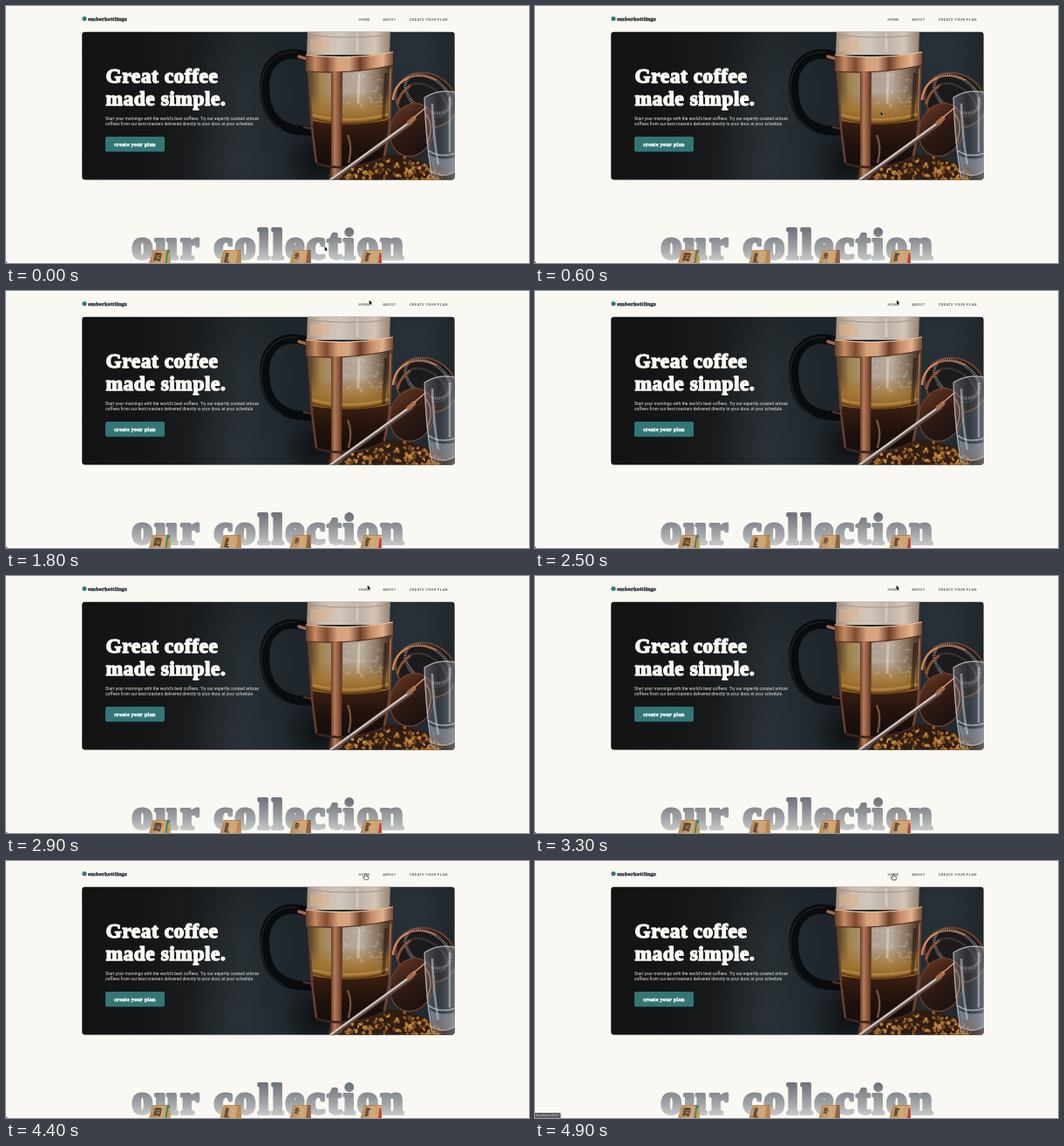
These frames come from a looping animation (600x295 px, 5 s). An HTML page with a canvas:

```html
<!DOCTYPE html>
<html lang="en">
<head>
<meta charset="utf-8">
<title>Coffee shop landing page</title>
<style>
  html, body { margin: 0; width: 100%; height: 100%; overflow: hidden; background: #faf8f2; }
  canvas { display: block; width: 600px; height: 295px; }
</style>
</head>
<body>
<canvas id="stage"></canvas>
<script>
const W = 600, H = 295, LOOP = 5000, STEP = 100;
const SERIF = '"Liberation Serif", "Times New Roman", serif';
const SANS = 'Roboto, "Liberation Sans", sans-serif';
const CREAM = '#fdfbf5';
const dpr = window.devicePixelRatio || 1;

function prepare(canvas) {
  canvas.width = W * dpr;
  canvas.height = H * dpr;
  const c = canvas.getContext('2d');
  c.scale(dpr, dpr);
  c.lineJoin = 'round';
  return c;
}

const view = prepare(document.getElementById('stage'));
const page = document.createElement('canvas');
const g = prepare(page);

let seed = 7;
function rnd(a, b) {
  seed = (seed * 16807) % 2147483647;
  return a + (b - a) * seed / 2147483647;
}

function grad(x0, y0, x1, y1, ...colors) {
  const f = g.createLinearGradient(x0, y0, x1, y1);
  colors.forEach((c, i) => f.addColorStop(i / (colors.length - 1), c));
  return f;
}

function glow(x, y, r, rgb, alpha) {
  const f = g.createRadialGradient(x, y, 0, x, y, r);
  f.addColorStop(0, `rgba(${rgb},${alpha})`);
  f.addColorStop(1, `rgba(${rgb},0)`);
  g.fillStyle = f;
  g.fillRect(x - r, y - r, 2 * r, 2 * r);
}

function rect(fill, x, y, w, h, r = 0) {
  g.fillStyle = fill;
  g.beginPath();
  g.roundRect(x, y, w, h, r);
  g.fill();
}

function shape(fill, d) {
  g.fillStyle = fill;
  g.fill(new Path2D(d));
}

function line(color, width, d) {
  g.strokeStyle = color;
  g.lineWidth = width;
  g.stroke(new Path2D(d));
}

function oval(x, y, rx, ry, turn, fill, stroke, width) {
  g.beginPath();
  g.ellipse(x, y, rx, ry, turn, 0, Math.PI * 2);
  if (fill) { g.fillStyle = fill; g.fill(); }
  if (stroke) { g.strokeStyle = stroke; g.lineWidth = width; g.stroke(); }
}

// weight thickens the glyphs with an outline
function text(str, x, y, font, fill, weight = 0, spacing = 0) {
  g.font = font;
  g.letterSpacing = spacing + 'px';
  g.fillStyle = fill;
  g.fillText(str, x, y);
  if (weight) {
    g.strokeStyle = fill;
    g.lineWidth = weight;
    g.strokeText(str, x, y);
  }
  g.letterSpacing = '0px';
}

function backdrop() {
  rect(grad(87, 0, 515, 0, '#131314', '#141516', '#181a1c', '#21272b', '#1f262b', '#20272c', '#242c32', '#20272c'),
    87, 29, 428, 172);
  glow(270, 100, 70, '62,74,82', 0.22);
  glow(265, 180, 70, '66,76,84', 0.3);
  glow(470, 55, 50, '60,74,84', 0.25);
  glow(360, 178, 42, '6,7,9', 0.7);
}

function strainer() {
  oval(482, 108, 36, 30, 0.5, '#1c1a1b', '#6b412f', 2);
  g.setLineDash([1.1, 1.3]);
  oval(484, 101, 29, 18, 0.6, null, '#8d8886', 3.6);
  oval(483, 108, 26, 15, 0.6, null, '#55504f', 2.4);
  g.setLineDash([]);
  oval(466, 142, 25, 31, 0.35, grad(445, 112, 488, 170, '#6d3b25', '#2e1913', '#151011'), '#6e432f', 1.2);
  line('#d28b5e', 2.4, 'M444 108 Q445 90 462 82');
  line('#8d5134', 3, 'M449 113 Q451 100 464 91');
  line('#b8714a', 1.6, 'M461 82 Q478 77 494 85');
  line('#a5633f', 1.8, 'M482 124 Q492 138 483 158');
}

function beans() {
  shape('#2f1c11', 'M382 200 Q394 180 416 172 Q446 165 486 182 L515 190 V200 Z');
  const tones = ['#a8702f', '#c08743', '#6d421f', '#3a2213', '#93602b'];
  for (let i = 0; i < 170; i++) {
    const x = rnd(390, 500);
    const top = 172 + Math.abs(x - 440) ** 2 / 170;
    oval(x, rnd(Math.min(top, 198), 201), rnd(1.5, 3), rnd(1.1, 2.1), rnd(0, 3), tones[i % 5]);
  }
}

function handle() {
  const arc = 'M346 58 C312 47 294 69 297 99 C299 130 318 146 354 143';
  g.lineCap = 'round';
  line('#0a0b0d', 11, arc);
  line('rgba(92,105,114,.45)', 0.8, 'M333 53 C306 51 291 73 293 100 C295 121 304 135 318 142');
  line('#a56c4c', 3.4, 'M336 58 L346 61');
  line('#4d3126', 2.4, 'M342 139 L352 141');
  g.lineCap = 'butt';
}

function press() {
  // glass and its contents
  shape(grad(344, 0, 443, 0, '#a08d7c', '#cdbfb0', '#cfc6bd', '#bdb1a5', '#d3c6b8', '#8e7a69'),
    'M346 29 H441 L440 56 H345 Z');
  shape(grad(345, 0, 441, 0, '#45331f', '#a5844d', '#a8967f', '#b0a396', '#b9aa99', '#8d7863', '#3f2c20'),
    'M346 70 H441 L437 134 H352 Z');
  shape(grad(0, 98, 0, 136, 'rgba(150,108,50,0)', 'rgba(164,116,45,.75)', '#8a5a1d'),
    'M349 98 H440 L437 136 H352 Z');
  shape(grad(0, 132, 0, 190, '#3a1e10', '#1f110d', '#120d0d'),
    'M352 132 Q394 140 438 131 L435 172 Q395 192 357 182 Z');
  g.setLineDash([1.3, 0.8]);
  line('#c39a4b', 2.4, 'M352 125 Q394 136 439 124');
  g.setLineDash([]);
  line('#5f3c17', 1.4, 'M352 129 Q394 141 438 128');
  for (let i = 0; i < 70; i++)
    oval(rnd(388, 434), rnd(79, 116), rnd(0.5, 2.2), rnd(0.5, 1.8), 0, 'rgba(218,208,194,.22)');
  line('rgba(240,234,225,.4)', 3, 'M403 31 V53 M405 77 L404 112');
  line('rgba(30,18,12,.5)', 4, 'M436 77 L433 130');
  line('#7a5038', 2.4, 'M392 148 Q398 162 393 180');
  line('#a89280', 1.2, 'M346 33 Q394 39 441 33');
  shape('rgba(222,178,138,.55)', 'M349 38 H371 V52 H349 Z');

  // copper frame
  shape(grad(342, 0, 445, 0, '#54301f', '#c68b62', '#7d4b33', '#d9a27a', '#d5a582', '#6d3e29', '#c88d66', '#e0b38f', '#6d3f2b'),
    'M344 55 Q394 62 444 52 V68 Q394 79 344 75 Z');
  line('#e8c3a2', 1, 'M344 56 Q394 63 444 53');
  line('#4a291c', 1.2, 'M344 75 Q394 79 444 68');
  shape(grad(372, 0, 387, 0, '#4f2b1d', '#b67c58', '#8a543a', '#3c2219'),
    'M373 75 H386 L385 184 L387 196 Q378 201 370 198 L373 184 Z');
  line('#6a402c', 2.4, 'M347 75 L351 140 L356 180');
  line('#6f432f', 3, 'M442 69 L440 142 L434 172');
  line('#bd8560', 1, 'M441 72 L439 130');
  line('#3d241b', 2.6, 'M356 181 Q394 192 434 174');
}

function plunger() {
  g.lineCap = 'round';
  line('#5d4c46', 4.2, 'M371 202 L465 134');
  line('#cfc3bd', 2.4, 'M370 201 L465 132');
  line('#a86c4a', 5, 'M462 134 L468 129');
  line('#d29a75', 1.6, 'M468 128 L481 117');
  g.lineCap = 'butt';
}

function tumbler() {
  shape(grad(478, 0, 515, 0, 'rgba(178,184,194,.42)', 'rgba(100,108,118,.25)', 'rgba(170,176,188,.5)'),
    'M480 105 Q497 94 515 99 V200 H489 Q481 160 480 105 Z');
  line('rgba(214,217,224,.75)', 1.2, 'M480 105 Q482 160 489 197 M480 105 Q496 95 515 99');
  line('rgba(214,217,226,.5)', 2.6, 'M489 112 Q490 150 496 182 M509 105 V168');
  line('rgba(212,215,222,.6)', 1.8, 'M485 166 Q498 175 515 169 M487 190 Q501 198 515 190');
  shape('rgba(200,202,212,.4)', 'M486 171 Q499 178 515 174 V190 Q502 196 489 190 Z');
}

function hero() {
  g.save();
  g.beginPath();
  g.roundRect(87.2, 29.7, 427.5, 169.7, 3.4);
  g.clip();
  [backdrop, strainer, beans, handle, press, plunger, tumbler].forEach(draw => draw());
  g.restore();

  const title = `bold 23.4px ${SERIF}`, body = `4.9px ${SANS}`;
  text('Great coffee', 114.5, 88.2, title, CREAM, 1.5, 0.55);
  text('made simple.', 114.5, 113.6, title, CREAM, 1.5, 0.55);
  text("Start your mornings with the world's best coffees. Try our expertly curated artisan",
    114, 130.9, body, '#e9e7e3');
  text('coffees from our best roasters delivered directly to your door, at your schedule.',
    114, 137, body, '#e9e7e3');
  rect('#327676', 114, 150, 68, 17.3, 2);
  text('create your plan', 124, 160.8, `bold 6.6px ${SERIF}`, CREAM, 0.4, 0.1);
}

function header() {
  oval(90, 14.6, 2.6, 2.6, 0, '#2b7d7a');
  text('emberkettlings', 94, 16.8, `bold 6.8px ${SERIF}`, '#2c3038', 0.35, 0.1);
  const nav = `bold 4.3px ${SANS}`;
  [['HOME', 404.5], ['ABOUT', 432.2], ['CREATE YOUR PLAN', 462.7]]
    .forEach(([label, x]) => text(label, x, 16.7, nav, '#6c7178', 0, 0.26));
}

function bag(x, words, edge, trim) {
  shape(grad(x, 0, x + 23, 0, '#b98c5c', '#d2a977', '#c79b69'),
    `M${x + 2} 280.5 L${x + 22} 280 L${x + 20} 295 H${x - 2} Z`);
  shape(edge, `M${x + 18.5} 280 H${x + 22} L${x + 22.5} 295 H${x + 16.5} Z`);
  if (trim) shape(trim, `M${x + 20} 284 L${x + 22} 283 L${x + 22.5} 295 H${x + 18.5} Z`);
  line('#9a7148', 0.6, `M${x + 2} 280.8 L${x + 22} 280.3`);
  words.forEach((word, i) => {
    g.save();
    g.translate(x + 5 + i * 4.5, 283);
    g.rotate(1.75);
    text(word, 0, 0, `bold 7px ${SERIF}`, '#332a23', 0.2);
    g.restore();
  });
}

function collection() {
  const ink = grad(0, 257, 0, 302, '#71767d', '#a4a7aa', '#e6e5e1');
  text('our collection', 144.5, 290.2, `bold 47.5px ${SERIF}`, ink, 3.8, 2.75);
  bag(166, ['esk', 'gro'], '#3d8581', '#c99c43');
  bag(247.5, ['mal'], '#b98751');
  bag(327.5, ['tic'], '#8f6047');
  bag(408.5, ['lun'], '#d0a572', '#b8433f');
}

function buildPage() {
  rect('#faf8f2', 0, 0, W, H);
  header();
  hero();
  collection();
  shape('#222', 'M0 293 Q.4 294.6 2 295 H0 Z');
}

// time, x, y of the pointer tip
const path = [
  [0, 365.6, 276], [300, 379, 207], [600, 396.4, 121], [900, 410, 50], [1200, 416, 14],
  [1400, 416.7, 10.6], [1800, 416.7, 10.6], [2500, 415, 10.6], [3300, 414.6, 10.8],
  [4000, 414, 11.6], [4200, 413, 15], [4800, 411.2, 15.6], [LOOP, 411.2, 15.6]
];

function tipAt(t) {
  const i = path.findIndex(p => p[0] > t);
  const [t0, x0, y0] = path[i - 1], [t1, x1, y1] = path[i];
  const k = (t - t0) / (t1 - t0);
  return [x0 + (x1 - x0) * k, y0 + (y1 - y0) * k];
}

const arrow = new Path2D('M0 0 V4.9 L1.1 3.9 L1.9 5.6 L2.7 5.2 L2 3.6 L3.5 3.5 Z');
const hand = new Path2D('M-.7 .5 Q0 -.4 .6 .5 V2.3 L2.5 2.7 Q3.1 2.9 3 3.6 L2.5 6 H-.8 ' +
  'L-2.5 3.8 Q-2.5 3 -1.7 3.3 L-.7 4 Z');

function pointer(t) {
  view.save();
  view.translate(...tipAt(t));
  const onLink = t >= 4200;
  const icon = onLink ? hand : arrow;
  view.lineWidth = onLink ? 1.2 : 0.7;
  view.strokeStyle = onLink ? '#222' : '#f4f4f4';
  view.fillStyle = onLink ? '#fff' : '#111';
  view.stroke(icon);
  view.fill(icon);
  view.restore();
}

function statusBar() {
  view.fillStyle = '#5f5b5c';
  view.beginPath();
  view.roundRect(-2, 289, 31.5, 8, 1.4);
  view.fill();
  view.font = `4.1px ${SANS}`;
  view.fillStyle = '#c9c6c5';
  view.fillText('localhost:4321', 0.8, 293.4);
}

function frame(now) {
  const t = Math.floor((now % LOOP) / STEP) * STEP;
  view.drawImage(page, 0, 0, W, H);
  if (t >= 4900) statusBar();
  pointer(t);
  requestAnimationFrame(frame);
}

buildPage();
frame(performance.now());
</script>
</body>
</html>
```
